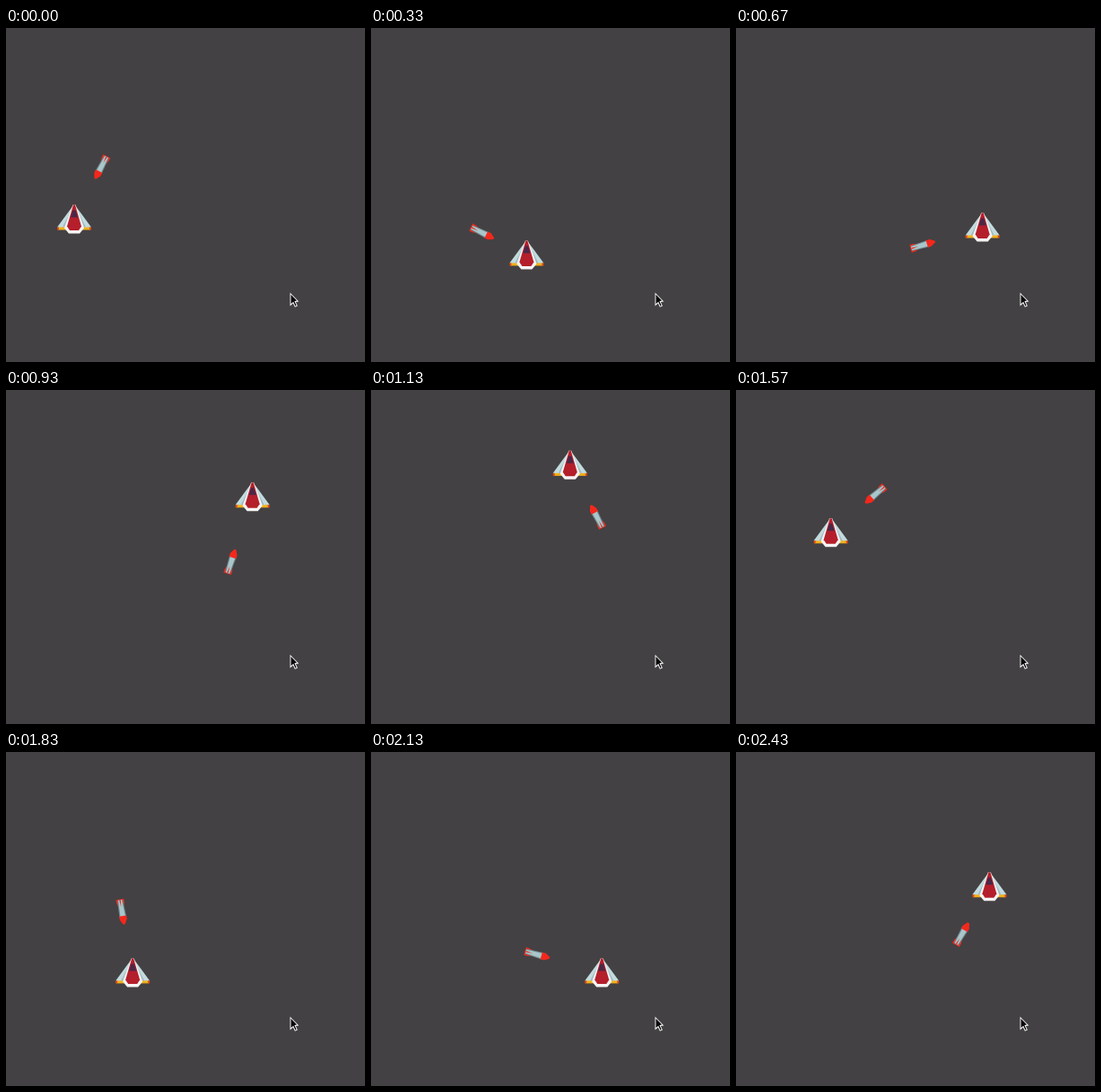
An HTML page with a canvas that plays this animation: 400 px wide and 373 px high, repeating every 2.46 s.

```html
<!DOCTYPE html>
<html lang="en">
<head>
<meta charset="utf-8">
<title>Homing rocket</title>
<style>
  html, body { margin: 0; width: 100%; height: 100%; overflow: hidden; background: #434143; }
  canvas { display: block; }
</style>
</head>
<body>
<canvas id="stage" width="400" height="373"></canvas>
<script>
const ctx = document.getElementById('stage').getContext('2d');
const LOOP = 2460;
const STEP = 100 / 3;
const STEPS = 74;
const SHIP_SPEED = 12.9;   // pixels per step
const ROCKET_SPEED = 8.65;

const LEFT = [-1, 0], RIGHT = [1, 0], UP = [0, -1], DOWN = [0, 1];

// Arrow keys held by the player, in steps
const presses = [
  { dir: DOWN, from: 0, to: 3.1 },
  { dir: RIGHT, from: 2.45, to: 17.85 },
  { dir: UP, from: 17.6, to: 30.75 },
  { dir: LEFT, from: 29.9, to: 43 },
  { dir: DOWN, from: 41.15, to: 53.75 },
  { dir: RIGHT, from: 52.25, to: 65.95 },
  { dir: UP, from: 65.55, to: STEPS },
];

function shipAt(step) {
  const p = { x: 76, y: 213.5 };
  for (const { dir, from, to } of presses) {
    const travel = SHIP_SPEED * Math.max(0, Math.min(step, to) - from);
    p.x += dir[0] * travel;
    p.y += dir[1] * travel;
  }
  return p;
}

// The rocket always flies straight at the ship
function chase() {
  const sub = 10;
  const track = [];
  let x = 106, y = 155.5;
  for (let n = 0; n < STEPS * sub; n++) {
    const ship = shipAt(n / sub);
    const angle = Math.atan2(ship.y - y, ship.x - x);
    if (n % sub === 0) track.push({ x, y, angle });
    x += Math.cos(angle) * ROCKET_SPEED / sub;
    y += Math.sin(angle) * ROCKET_SPEED / sub;
  }
  return track;
}

const track = chase();

function poly(color, ...points) {
  ctx.fillStyle = color;
  ctx.beginPath();
  for (let i = 0; i < points.length; i += 2) ctx.lineTo(points[i], points[i + 1]);
  ctx.closePath();
  ctx.fill();
}

function placed(x, y, angle, draw) {
  ctx.save();
  ctx.translate(x, y);
  ctx.rotate(angle);
  draw();
  ctx.restore();
}

function drawWing() {
  poly('#c3dbde', -2, -14, -8, -6, -19, 9, -8, 11);
  poly('#9fb8be', -6, -5, -13, 9, -11, 9);
  poly('#f0b01a', -18, 9, -9, 9, -9, 12, -18, 12);
  poly('#e2471b', -19, 9, -17, 9, -17, 12, -19, 12);
}

function drawShip() {
  drawWing();
  ctx.scale(-1, 1);
  drawWing();
  poly('#f6f4f4', -1.5, -16, 1.5, -16, 11, 10, 6, 16, -6, 16, -11, 10);
  poly('#b41f2b', -1, -16, 1, -16, 8, 8, 5, 12.5, -5, 12.5, -8, 8);
  poly('#4a2848', -1.5, -10, 1.5, -10, 4, -2, -4, -2);
}

function drawRocket() {
  poly('#e8291d', -14, -4.5, -10, -4.5, -5, -3, -5, 3, -10, 4.5, -14, 4.5);
  poly('#71858a', -13, -3, 7, -4, 7, 4, -13, 3);
  poly('#a9c6cb', -13, -2, 6, -2.8, 6, 2.8, -13, 2);
  poly('#e8291d', -13, -0.8, -5, 0, -13, 0.8);
  poly('#f3281c', 5, -4, 9, -4, 14.5, -1, 14.5, 1, 9, 4, 5, 4);
}

function drawCursor() {
  poly('#f4f4f4', 0, 0, 9.8, 10, 6.4, 10.5, 8.4, 15.2, 5.4, 16.4, 3.3, 12, 0, 15);
  poly('#050505', 1, 2.4, 7.6, 9.2, 4.9, 9.5, 7.1, 14.6, 5.9, 15.1, 3.7, 10.4, 1, 12.7);
}

function render(now) {
  const tick = Math.floor((now % LOOP) / 10) * 10;
  const step = Math.min(STEPS - 1, Math.floor((tick + 5) / STEP));
  const ship = shipAt(step);
  const rocket = track[step];
  ctx.fillStyle = '#434143';
  ctx.fillRect(0, 0, 400, 373);
  placed(ship.x, ship.y, 0, drawShip);
  placed(rocket.x, rocket.y, rocket.angle, drawRocket);
  placed(316.5, 295.4, 0, drawCursor);
}

const began = performance.now();
function loop() {
  render(performance.now() - began);
  requestAnimationFrame(loop);
}
loop();
</script>
</body>
</html>
```
